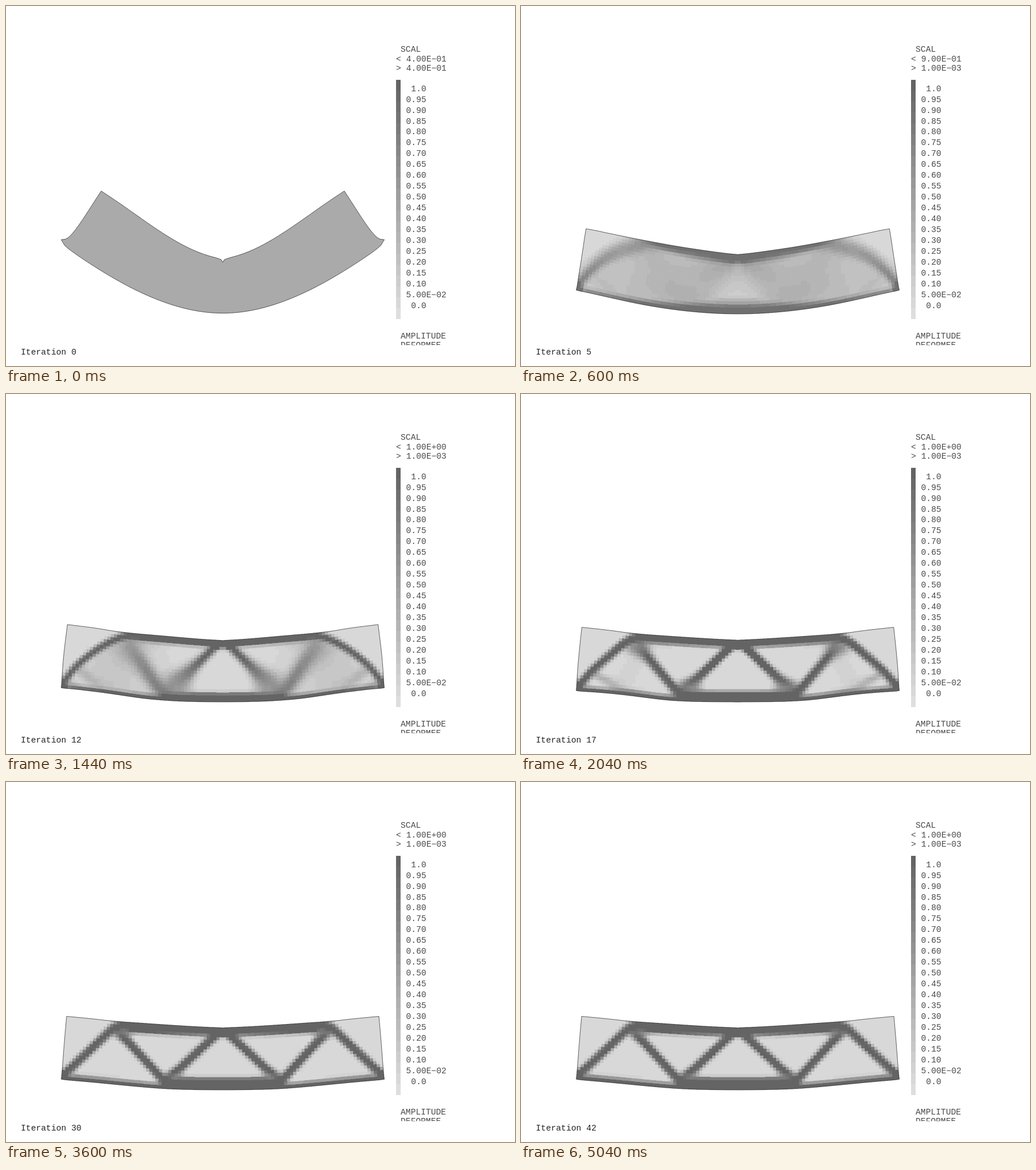
An HTML page for the animation above (5160 ms loop, 890 by 629 pixels).

```html
<!DOCTYPE html>
<html lang="en">
<head>
<meta charset="utf-8">
<title>Beam optimisation</title>
<style>
  html, body { margin: 0; width: 100%; height: 100%; overflow: hidden; background: #fff; }
  svg { display: block; width: 890px; height: 629px; }
  text { font: 14.7px "Liberation Mono", "Courier New", monospace; fill: #4a4a4a; white-space: pre; }
  #iter { fill: #222; }
  #mesh, #bar { shape-rendering: crispEdges; }
  #edge { fill: none; stroke: #333; stroke-width: 0.75; }
</style>
</head>
<body>
<svg viewBox="0 0 890 629">
  <defs><clipPath id="cut"><rect x="680" y="560" width="120" height="32.5"/></clipPath></defs>
  <g id="mesh"></g>
  <path id="edge"/>
  <g id="bar"></g>
  <g id="labels"></g>
  <text x="690" y="80">SCAL</text>
  <text id="max" x="682" y="97"></text>
  <text id="min" x="682" y="113"></text>
  <g clip-path="url(#cut)">
    <text x="690" y="581">AMPLITUDE</text>
    <text x="690" y="597">DEFORMEE</text>
  </g>
  <text id="iter" x="26" y="609"></text>
</svg>
<script>
const STEP = 120, COUNT = 43;
// Left half of a simply supported beam, loaded at the top of its middle.
const NX = 50, NY = 20, VOL = 0.4, MOVE = 0.1, LOW = 1e-3, POWER = 3, RADIUS = 1.5, NU = 0.3;
const ROWS = NY + 1, DOFS = 2 * (NX + 1) * ROWS, BAND = 2 * ROWS + 3, WIDE = BAND + 1;
const LEVELS = 22, MID = 379, SPAN = 565, SAG = 0.2274;

const $ = id => document.getElementById(id);
const node = (i, j) => i * ROWS + j;
const clamp = (v, a, b) => Math.max(a, Math.min(b, v));

function elementStiffness() {
  const k = [1 / 2 - NU / 6, 1 / 8 + NU / 8, -1 / 4 - NU / 12, -1 / 8 + 3 * NU / 8,
    -1 / 4 + NU / 12, -1 / 8 - NU / 8, NU / 6, 1 / 8 - 3 * NU / 8];
  return ["01234567", "10765432", "27056341", "36507214",
    "45670123", "54321076", "63412705", "72143650"]
    .map(row => [...row].map(c => k[c] / (1 - NU * NU)));
}

const KE = elementStiffness();
const cells = [];
for (let i = 0; i < NX; i++) for (let j = 0; j < NY; j++) {
  const corners = [node(i, j), node(i + 1, j), node(i + 1, j + 1), node(i, j + 1)];
  cells.push({ i, j, dofs: corners.flatMap(n => [2 * n, 2 * n + 1]) });
}

const fixed = new Set([2 * node(0, NY) + 1]);
for (let j = 0; j <= NY; j++) fixed.add(2 * node(NX, j));

// Banded Cholesky solve of the elastic problem.
function solve(x) {
  const a = new Float64Array(DOFS * WIDE), u = new Float64Array(DOFS);
  const at = (r, c) => r * WIDE + c - r + BAND;
  cells.forEach(({ dofs }, e) => {
    const E = x[e] ** POWER;
    dofs.forEach((r, p) => dofs.forEach((c, q) => {
      if (c <= r && !fixed.has(r) && !fixed.has(c)) a[at(r, c)] += E * KE[p][q];
    }));
  });
  fixed.forEach(d => { a[at(d, d)] = 1; });
  u[2 * node(NX, 0) + 1] = 1;
  for (let r = 0; r < DOFS; r++) {
    const first = Math.max(0, r - BAND), ro = r * WIDE - r + BAND;
    for (let c = first; c <= r; c++) {
      const co = c * WIDE - c + BAND;
      let s = a[ro + c];
      for (let k = first; k < c; k++) s -= a[ro + k] * a[co + k];
      a[ro + c] = c === r ? Math.sqrt(s) : s / a[co + c];
    }
    let s = u[r];
    for (let k = first; k < r; k++) s -= a[ro + k] * u[k];
    u[r] = s / a[ro + r];
  }
  for (let r = DOFS - 1; r >= 0; r--) {
    u[r] /= a[at(r, r)];
    for (let k = Math.max(0, r - BAND); k < r; k++) u[k] -= a[at(r, k)] * u[r];
  }
  return u;
}

// Weighted neighbours of each cell, mirrored across the middle.
const near = cells.map(({ i, j }) => {
  const list = [], n = Math.ceil(RADIUS);
  for (let di = -n; di <= n; di++) for (let dj = -n; dj <= n; dj++) {
    const w = RADIUS - Math.hypot(di, dj), b = j + dj;
    let a = i + di;
    if (a >= NX) a = 2 * NX - 1 - a;
    if (w > 0 && a >= 0 && b >= 0 && b < NY) list.push([a * NY + b, w]);
  }
  return list;
});

function improve(x, u) {
  const gain = cells.map(({ dofs }, e) => {
    let s = 0;
    for (let p = 0; p < 8; p++) for (let q = 0; q < 8; q++) s += u[dofs[p]] * KE[p][q] * u[dofs[q]];
    return POWER * x[e] ** (POWER - 1) * s;
  });
  const soft = near.map((list, e) => {
    let sum = 0, total = 0;
    for (const [n, w] of list) { sum += w * x[n] * gain[n]; total += w; }
    return sum / (total * x[e]);
  });
  let lo = 1e-9, hi = 1e9, next;
  for (let n = 0; n < 80; n++) {
    const mid = Math.sqrt(lo * hi);
    next = x.map((v, e) => clamp(v * Math.sqrt(soft[e] / mid),
      Math.max(LOW, v - MOVE), Math.min(1, v + MOVE)));
    if (next.reduce((s, v) => s + v, 0) > VOL * cells.length) lo = mid; else hi = mid;
  }
  return next;
}

const states = [];
for (let n = 0, x = cells.map(() => VOL); n < COUNT; n++) {
  const u = solve(x);
  states.push({ x, u });
  x = improve(x, u);
}

const corner = 2 * node(0, NY), foot = 2 * node(NX, NY) + 1;
const u0 = states[0].u;
const AMP = SAG * 2 * NX / (u0[foot] + 2 * SAG * u0[corner]);

const shade = k => { const g = Math.round(222 - k * 122 / (LEVELS - 1)); return `rgb(${g},${g},${g})`; };
const level = v => Math.min(LEVELS - 1, Math.floor(v * 20 + 1e-6) + 1);
const sci = v => {
  const [m, e] = v.toExponential(2).split("e");
  return m + "E" + (e < 0 ? "\u2212" : "+") + String(Math.abs(e)).padStart(2, "0");
};

function add(parent, tag, attrs, text = "") {
  const el = document.createElementNS("http://www.w3.org/2000/svg", tag);
  for (const k in attrs) el.setAttribute(k, attrs[k]);
  el.textContent = text;
  return $(parent).appendChild(el);
}

const layers = [];
for (let k = 0; k < LEVELS; k++) {
  layers.push(add("mesh", "path", { fill: shade(k), stroke: shade(k), "stroke-width": 0.3 }));
  add("bar", "rect", { x: 682, y: 528 - k * 19, width: 8, height: 19, fill: shade(k) });
}
for (let k = 0; k <= 20; k++) {
  const label = k === 0 ? " 0.0" : k === 1 ? "5.00E\u221202" : k === 20 ? " 1.0" : (k / 20).toFixed(2);
  add("labels", "text", { x: 699.5, y: 528 - k * 18.97 }, label);
}

function draw(n) {
  const { x, u } = states[n];
  const scale = SPAN / (2 * NX - 2 * AMP * u[corner]);
  const base = (n ? 538 : 536.7) - scale * (NY + AMP * u[foot]);
  const point = (i, j, side) => {
    const d = 2 * node(i, j);
    return (MID + side * scale * (NX - i - AMP * u[d])).toFixed(2) + " "
      + (base + scale * (j + AMP * u[d + 1])).toFixed(2);
  };
  const paths = layers.map(() => "");
  cells.forEach(({ i, j }, e) => {
    for (const s of [-1, 1]) {
      paths[level(x[e])] += "M" + [point(i, j, s), point(i + 1, j, s),
        point(i + 1, j + 1, s), point(i, j + 1, s)].join("L") + "Z";
    }
  });
  layers.forEach((el, k) => el.setAttribute("d", paths[k]));

  const half = side => {
    const pts = [];
    for (let i = NX; i > 0; i--) pts.push(point(i, 0, side));
    for (let j = 0; j < NY; j++) pts.push(point(0, j, side));
    for (let i = 0; i <= NX; i++) pts.push(point(i, NY, side));
    return pts;
  };
  $("edge").setAttribute("d", "M" + half(-1).concat(half(1).reverse()).join("L") + "Z");
  $("max").textContent = "< " + sci(Math.max(...x));
  $("min").textContent = "> " + sci(Math.min(...x));
  $("iter").textContent = "Iteration " + n;
}

let shown = -1;
function tick() {
  const n = Math.floor(performance.now() / STEP) % COUNT;
  if (n !== shown) draw(shown = n);
  requestAnimationFrame(tick);
}
tick();
</script>
</body>
</html>
```
